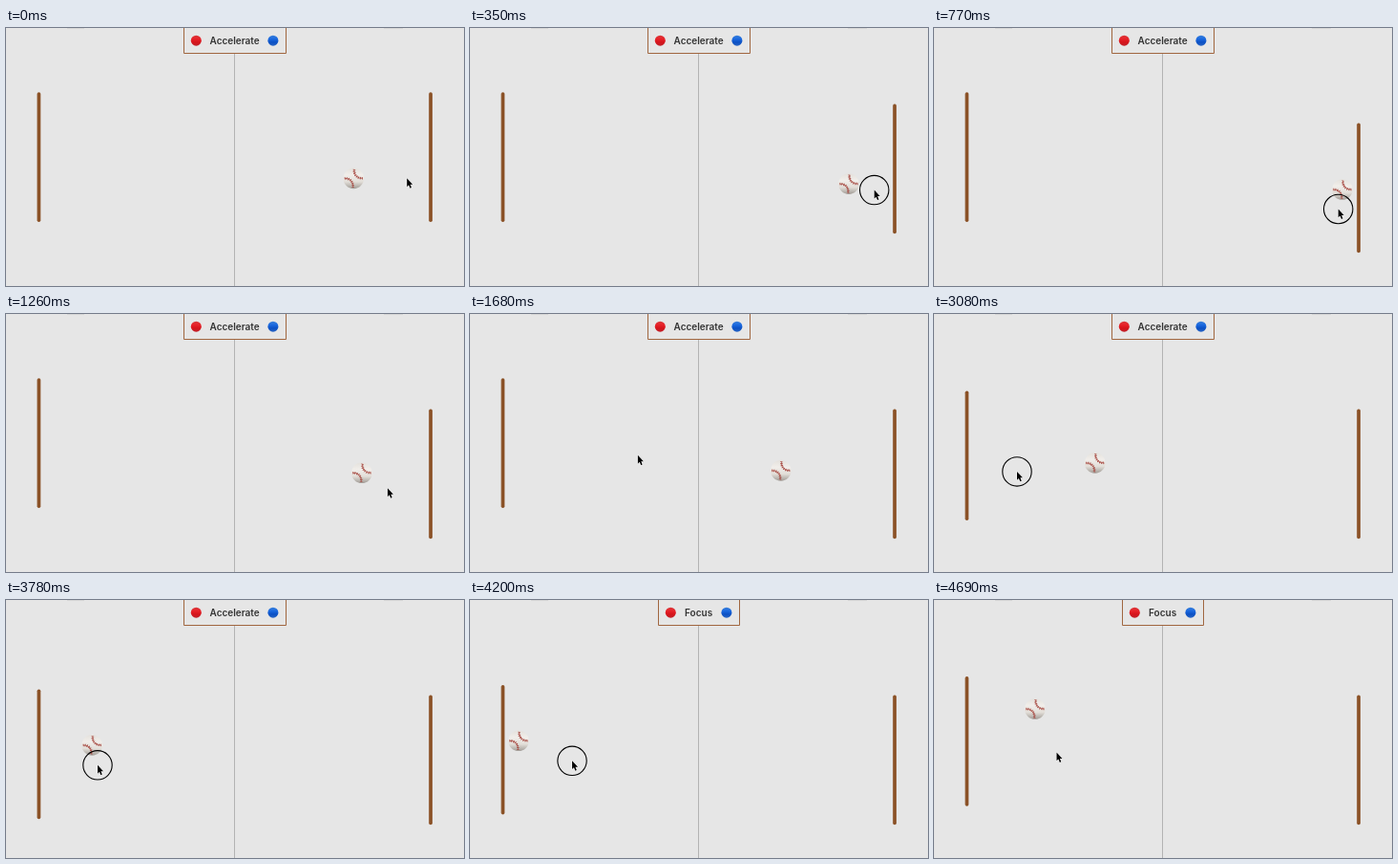
An HTML page with a canvas for the animation above (4.76 s loop, 480x270 px).

```html
<!DOCTYPE html>
<html lang="en">
<head>
<meta charset="utf-8">
<title>Paddle game</title>
<style>
html, body { margin: 0; width: 100%; height: 100%; overflow: hidden; background: #e6e6e6; }
canvas { display: block; width: 480px; height: 270px; }
</style>
</head>
<body>
<canvas id="stage"></canvas>
<script>
const LOOP = 4760, STEP = 70;
const HIT_RIGHT = 725, HIT_LEFT = 4165;
const BACK = '#e6e6e6', BROWN = '#8b5227';
const canvas = document.getElementById('stage');
const ctx = canvas.getContext('2d');
const dpr = window.devicePixelRatio || 1;
canvas.width = 480 * dpr;
canvas.height = 270 * dpr;

function ease(t, start, end) {
  const p = Math.min(1, Math.max(0, (t - start) / (end - start)));
  return p * p * (3 - 2 * p);
}

// Straight flight, turned around at each paddle.
function ballAt(t) {
  if (t < HIT_RIGHT) {
    const left = HIT_RIGHT - t;
    return [432 - .0934 * left, 169.3 - .0165 * left];
  }
  const fromLeft = t - HIT_LEFT;
  const slope = fromLeft < 0 ? -.0057 : -.068;
  return [47 + .1122 * Math.abs(fromLeft), 149.7 + slope * fromLeft];
}

// The pointer drags the right paddle, crosses over, then drags the left one.
function sceneAt(t) {
  const rightDrag = 35 * ease(t, 210, 560) - 2.8 * ease(t, 560, 700);
  const cross = ease(t, 1120, 2015), approach = ease(t, 2520, 2800);
  const down = ease(t, 2800, 3360), up = ease(t, 4020, 4480);
  return {
    ball: ballAt(t),
    rightY: 67.3 + rightDrag,
    leftY: 67.3 + 26.2 * down - 13.5 * up,
    mouseX: 420.2 + 3.5 * ease(t, 0, 210) - 362 * cross + 16.3 * approach + 18 * down + 32.5 * up,
    mouseY: 157.3 + rightDrag - 41.7 * ease(t, 1120, 1650) + 9.2 * approach + 15.8 * down - 13.3 * up,
    pressed: t >= 210 && t < 910 || t >= 2520 && t < 4600,
  };
}

function disc(x, y, r, ...colors) {
  const g = ctx.createLinearGradient(x, y - r, x, y + r);
  colors.forEach((c, i) => g.addColorStop(i / (colors.length - 1), c));
  ctx.fillStyle = g;
  ctx.beginPath();
  ctx.arc(x, y, r, 0, Math.PI * 2);
  ctx.fill();
}

function paddle(x, y) {
  ctx.fillStyle = BROWN;
  ctx.beginPath();
  ctx.roundRect(x, y, 3.7, 135.7, 1.8);
  ctx.fill();
}

function badge(label, width) {
  const mid = 240, dot = width / 2 - 13.2;
  ctx.fillStyle = BACK;
  ctx.strokeStyle = '#a0663f';
  ctx.lineWidth = 1;
  ctx.beginPath();
  ctx.rect(mid - width / 2, -.5, width, 27);
  ctx.fill();
  ctx.stroke();
  disc(mid - dot - .4, 13.2, 5.5, '#d8393b', '#e8232a', '#d5141b', '#c0222a');
  disc(mid + dot - .4, 13.2, 5.5, '#3a7fd8', '#1c6ae0', '#0b50c4', '#2a66c4');
  ctx.fillStyle = '#333';
  ctx.font = '600 10px Inter, sans-serif';
  ctx.textAlign = 'center';
  ctx.fillText(label, mid - .4, 16.9);
}

function seam() {
  ctx.beginPath();
  ctx.arc(-11.5, 0, 7.8, -.95, .95);
  ctx.lineWidth = .7;
  ctx.stroke();
  ctx.lineWidth = 2.6;
  ctx.setLineDash([.8, 1.2]);
  ctx.stroke();
  ctx.setLineDash([]);
}

function ball(x, y) {
  disc(x, y, 10.8, '#e4e1dc', '#f1eeea', '#e2ded8', '#a19c96');
  ctx.save();
  ctx.translate(x, y);
  ctx.rotate(-.75);
  ctx.strokeStyle = '#a4443c';
  seam();
  ctx.rotate(Math.PI);
  seam();
  ctx.restore();
}

function pointer(x, y, pressed) {
  if (pressed) {
    ctx.beginPath();
    ctx.arc(x, y, 15.2, 0, Math.PI * 2);
    ctx.strokeStyle = '#000';
    ctx.lineWidth = 1.1;
    ctx.stroke();
  }
  const arrow = new Path2D('M0 0V9.3L2.1 7.4L3.7 11L5.3 10.3L3.8 6.8H6.7Z');
  ctx.save();
  ctx.translate(x, y);
  ctx.scale(.9, .95);
  ctx.strokeStyle = '#fff';
  ctx.lineWidth = 1;
  ctx.stroke(arrow);
  ctx.fillStyle = '#000';
  ctx.fill(arrow);
  ctx.restore();
}

function draw(t) {
  const scene = sceneAt(t);
  ctx.setTransform(dpr, 0, 0, dpr, 0, 0);
  ctx.fillStyle = BACK;
  ctx.fillRect(0, 0, 480, 270);
  ctx.fillStyle = '#d6d6d6';
  ctx.fillRect(64, 0, 18, 1);
  ctx.fillRect(396, 0, 20, 1);
  ctx.fillStyle = '#b3b3b3';
  ctx.fillRect(239, 0, 1, 270);
  if (t < HIT_LEFT) badge('Accelerate', 107);
  else badge('Focus', 85);
  paddle(32.6, scene.leftY);
  paddle(443.2, scene.rightY);
  ball(...scene.ball);
  pointer(scene.mouseX, scene.mouseY, scene.pressed);
}

function tick() {
  const t = performance.now() % LOOP;
  draw(Math.floor(t / STEP) * STEP);
  requestAnimationFrame(tick);
}
tick();
</script>
</body>
</html>
```
